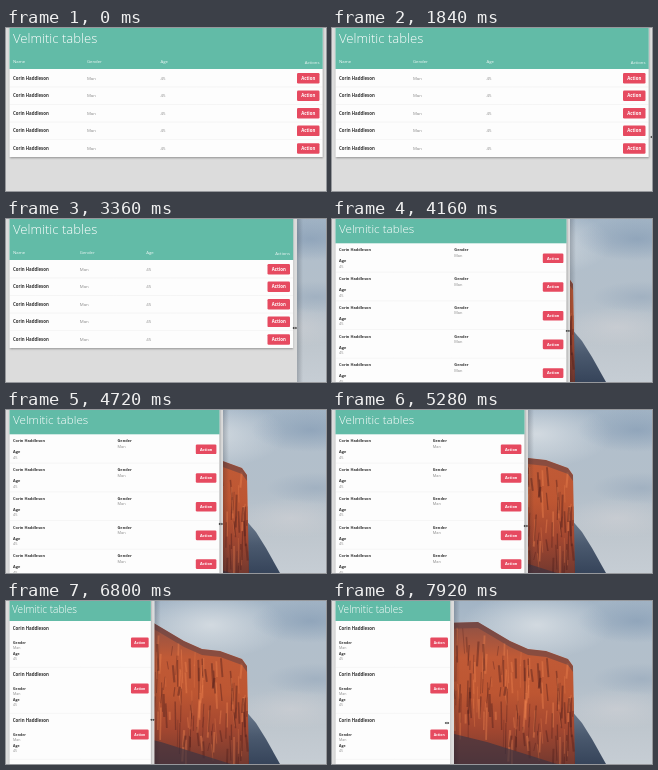
An HTML page with a canvas for the animation above (8000 ms loop, 320x163 px).

```html
<!DOCTYPE html>
<html lang="en">
<head>
<meta charset="utf-8">
<title>Responsive table</title>
<style>
html, body { margin: 0; width: 100%; height: 100%; overflow: hidden; background: #ddd; }
canvas { display: block; width: 320px; height: 163px; }
</style>
</head>
<body>
<canvas id="stage"></canvas>
<script>
const W = 320, H = 163, LOOP = 8000, STEP = 80;
const TITLE = 'Velmitic tables', PERSON = 'Corin Haddleson';
const TEAL = '#62bba7', RED = '#e64a60', DARK = '#333', GREY = '#8a8a8a';
const dpr = Math.max(1, window.devicePixelRatio || 1);

// Right edge of the window over time: [ms, x].
const EDGE = [[2080, 320.5], [3360, 291], [4160, 238], [5280, 196], [5920, 178], [7600, 122]];
// Outline of the cliff top: [x, y].
const RIDGE = [[110, 22], [146, 21], [178, 40], [196, 48], [214, 50], [236, 58], [241, 65]];

// Piecewise linear value through the key points.
function track(keys, t) {
  if (t <= keys[0][0]) return keys[0][1];
  for (let i = 1; i < keys.length; i++) {
    const [t0, a] = keys[i - 1], [t1, b] = keys[i];
    if (t <= t1) return a + (b - a) * (t - t0) / (t1 - t0);
  }
  return keys[keys.length - 1][1];
}

const ramp = (t, from, to) => Math.min(1, Math.max(0, (t - from) / (to - from)));

function random(seed) {
  return () => (seed = (seed * 16807) % 2147483647) / 2147483647;
}

function setup(canvas) {
  canvas.width = W * dpr;
  canvas.height = H * dpr;
  const c = canvas.getContext('2d');
  c.scale(dpr, dpr);
  return c;
}

const ctx = setup(document.getElementById('stage'));
const photo = document.createElement('canvas');
paintPhoto(setup(photo));

function polygon(c, fill, pts) {
  c.fillStyle = fill;
  c.beginPath();
  pts.forEach(([x, y]) => c.lineTo(x, y));
  c.closePath();
  c.fill();
}

function vertical(c, y0, y1, colours) {
  const g = c.createLinearGradient(0, y0, 0, y1);
  colours.forEach((col, i) => g.addColorStop(i / (colours.length - 1), col));
  return g;
}

function cloud(c, x, y, rx, ry, rgb, alpha) {
  c.save();
  c.translate(x, y);
  c.scale(rx, ry);
  const g = c.createRadialGradient(0, 0, 0, 0, 0, 1);
  g.addColorStop(0, `rgba(${rgb},${alpha})`);
  g.addColorStop(1, `rgba(${rgb},0)`);
  c.fillStyle = g;
  c.fillRect(-1, -1, 2, 2);
  c.restore();
}

// Soft sky, a dark slope and an orange cliff.
function paintPhoto(c) {
  const rnd = random(41);
  c.fillStyle = vertical(c, 0, H, ['#a2b4c5', '#b2bfcb', '#b3bfca', '#bec6cd', '#c6cdd4']);
  c.fillRect(0, 0, W, H);
  cloud(c, 205, 24, 75, 34, '217,223,228', .85);
  cloud(c, 305, 20, 60, 22, '128,152,178', .6);
  cloud(c, 310, 78, 50, 16, '140,160,182', .45);
  cloud(c, 285, 108, 55, 20, '208,209,213', .6);

  polygon(c, vertical(c, 108, H, ['#6c7b8e', '#4a596e', '#36445a']),
    [[238, 108], [250, 122], [260, 138], [274, H], [238, H]]);

  const base = [[243, H], [110, H]];
  polygon(c, vertical(c, 21, H, ['#8d5146', '#c05a36', '#bd5632', '#a34730', '#74392f']), [...RIDGE, ...base]);
  c.save();
  c.clip();
  for (let i = 0; i < 170; i++) {
    const x = 112 + rnd() * 132;
    const y = track(RIDGE, x) + 3 + rnd() * 95;
    c.strokeStyle = rnd() < .55 ? 'rgba(78,30,28,.42)' : 'rgba(236,128,76,.42)';
    c.lineWidth = .6 + rnd() * 1.6;
    c.beginPath();
    c.moveTo(x, y);
    c.lineTo(x + rnd() * 4 - 2, y + 8 + rnd() * 26);
    c.stroke();
  }
  const rim = RIDGE.map(([x, y]) => [x, y + 6]).reverse();
  polygon(c, 'rgba(98,66,70,.55)', [...RIDGE, ...rim]);
  polygon(c, 'rgba(58,52,66,.65)', [[110, 130], [155, 141], [225, H], [110, H]]);
  c.restore();
}

// y is the middle of the capitals.
function text(str, x, y, size, colour, weight = 400, align = 'left') {
  ctx.font = `${weight} ${size}px "Open Sans", "Noto Sans", sans-serif`;
  ctx.textAlign = align;
  ctx.fillStyle = colour;
  ctx.fillText(str, x, y + size * .36);
}

function button(right, y, w, h, size) {
  ctx.fillStyle = RED;
  ctx.beginPath();
  ctx.roundRect(right - w, y - h / 2, w, h, 1.2);
  ctx.fill();
  text('Action', right - w / 2, y, size, '#fff', 700, 'center');
}

function divider(y, right) {
  ctx.strokeStyle = '#dcdcdc';
  ctx.lineWidth = .5;
  ctx.setLineDash([1, 1]);
  ctx.beginPath();
  ctx.moveTo(3.5, y);
  ctx.lineTo(right, y);
  ctx.stroke();
  ctx.setLineDash([]);
}

function card(right, head, bottom) {
  ctx.save();
  ctx.shadowColor = 'rgba(0,0,0,.35)';
  ctx.shadowBlur = 2 * dpr;
  ctx.shadowOffsetY = .5 * dpr;
  ctx.fillStyle = '#fdfdfd';
  ctx.fillRect(3.5, -4, right - 3.5, bottom + 4);
  ctx.restore();
  ctx.fillStyle = TEAL;
  ctx.fillRect(3.5, 0, right - 3.5, head);
}

function field(label, value, x, y, gap, size) {
  text(label, x, y, size, DARK, 700);
  text(value, x, y + gap, size, GREY);
}

function wide(edge) {
  const right = edge - 7, span = edge - 14.5;
  const gender = 7 + span * .2415, age = 7 + span * .482;
  const pale = 'rgba(255,255,255,.9)';
  card(edge - 3.8, 41, 129);
  text(TITLE, 7, 10.4, 13.1, '#fff', 300);
  text('Name', 7, 33.5, 4.3, pale);
  text('Gender', gender, 33.5, 4.3, pale);
  text('Age', age, 33.5, 4.3, pale);
  text('Actions', right, 34.5, 4.3, pale, 400, 'right');
  for (let i = 0; i < 5; i++) {
    const y = 50.2 + i * 17.55;
    text(PERSON, 7, y, 4.35, DARK, 700);
    text('Man', gender, y, 4.35, GREY);
    text('45', age, y, 4.35, GREY);
    button(right, y, 22.5, 10.5, 4.35);
    if (i < 4) divider(y + 8.7, edge - 3.8);
  }
}

function medium(edge) {
  const col = 7 + (edge - 14) * .515;
  card(edge - 3.5, 24.3, H + 10);
  text(TITLE, 7, 9.8, 11.7, '#fff', 300);
  for (let i = 0; i < 5; i++) {
    const y = 31 + i * 28.7;
    text(PERSON, 7, y, 3.9, DARK, 700);
    field('Age', '45', 7, y + 11, 5.4, 3.9);
    field('Gender', 'Man', col, y, 5.6, 3.9);
    button(edge - 6.6, y + 8.3, 20.6, 9.6, 3.85);
    divider(y + 22.1, edge - 3.5);
  }
}

function narrow(edge) {
  card(edge - 3.8, 20, H + 10);
  text(TITLE, 6, 8, 10.1, '#fff', 300);
  for (let i = 0; i < 4; i++) {
    const y = 27 + i * 46;
    text(PERSON, 6.8, y, 4.4, DARK, 700);
    field('Gender', 'Man', 7, y + 14.5, 5, 3.55);
    field('Age', '45', 7, y + 26, 5, 3.55);
    button(edge - 6, y + 14.5, 17.7, 10, 3.4);
    divider(y + 39.3, edge - 3.8);
  }
}

function cursor(x, y) {
  ctx.fillStyle = '#333';
  ctx.fillRect(x - 1.5, y - .35, 3, .7);
  for (const side of [-1, 1]) {
    polygon(ctx, '#333', [[x + side * 2.3, y], [x + side * .7, y - 1.2], [x + side * .7, y + 1.2]]);
  }
}

function draw(t) {
  const edge = track(EDGE, t);
  ctx.drawImage(photo, 0, 0, W, H);

  const shade = ctx.createLinearGradient(edge, 0, edge + 6, 0);
  shade.addColorStop(0, 'rgba(20,25,35,.22)');
  shade.addColorStop(1, 'rgba(20,25,35,0)');
  ctx.fillStyle = shade;
  ctx.fillRect(edge, 0, 6, H);

  ctx.save();
  ctx.beginPath();
  ctx.rect(0, 0, edge, H);
  ctx.clip();
  ctx.fillStyle = '#dcdcdc';
  ctx.fillRect(0, 0, edge, H);
  (edge > 264 ? wide : edge > 183 ? medium : narrow)(edge);
  ctx.restore();

  // The pointer trails the edge and slips past it at the minimum width.
  if (t >= 1840) {
    const lag = 2.2 * ramp(t, 2080, 2400) + 4.8 * ramp(t, 7440, 7760);
    cursor(edge - lag, 109 + 7 * ramp(t, 3360, 5280) + 6 * ramp(t, 5920, 7760));
  }
}

const start = performance.now();
function frame() {
  const t = (performance.now() - start) % LOOP;
  draw(Math.floor(t / STEP) * STEP);
  requestAnimationFrame(frame);
}
frame();
</script>
</body>
</html>
```
